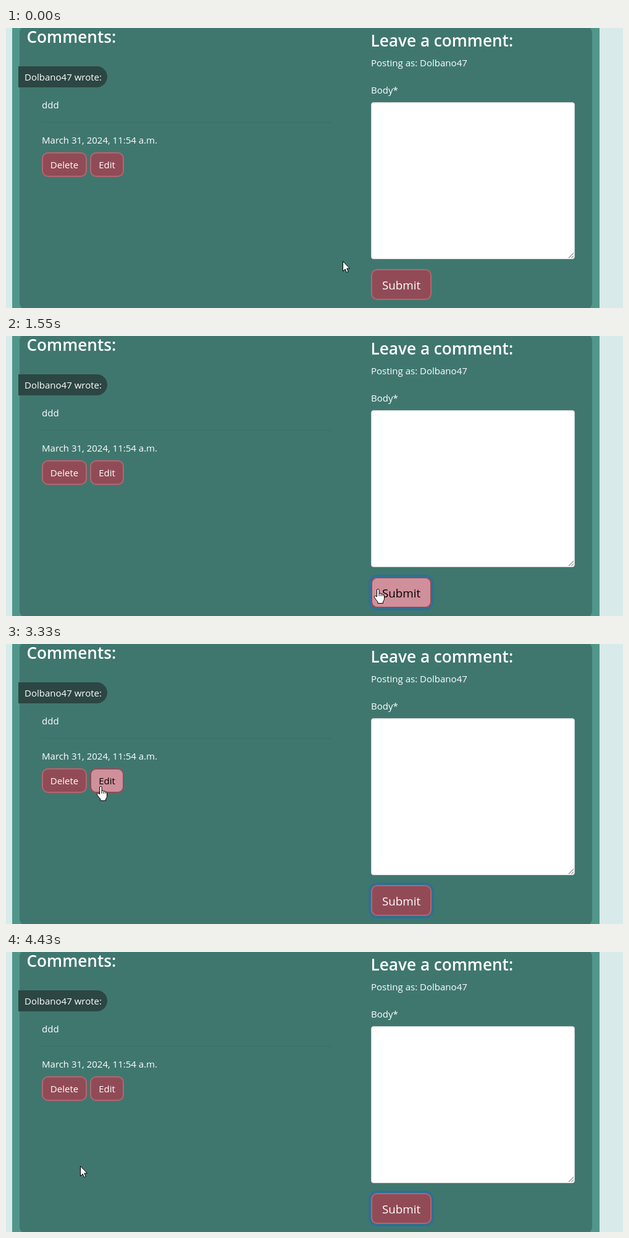
An HTML page that plays this animation: 999 px wide and 453 px high, repeating every 4.69 s.

```html
<!DOCTYPE html>
<html lang="en">
<head>
<meta charset="utf-8">
<title>Comments</title>
<style>
  html, body { margin: 0; width: 100%; height: 100%; overflow: hidden; background: #d8eae9; }
  svg { display: block; width: 999px; height: 453px; }
  text { font: 450 15px "Open Sans", "Noto Sans", sans-serif; fill: #fff; }
  .title { font-size: 26.2px; font-weight: 600; }
  .large { font-size: 18.75px; }
  .button rect { stroke-width: 2; fill: #914b56; stroke: #b5656f; }
  .button .hover rect { fill: #cf909b; stroke: #914b56; }
  .button .hover text { fill: #000; }
  #cursor path { fill: #fff; stroke: #000; stroke-linejoin: round; }
</style>
</head>
<body>
<svg viewBox="0 0 999 453">
  <rect x="10" width="951" height="453" fill="#50968b"/>
  <rect x="22" y="-5" width="927" height="462" rx="13" fill="#3f776f"/>

  <text class="title" x="33.5" y="24">Comments:</text>
  <path d="M20 62H147a17 17 0 0 1 0 34H20Z" fill="#2c4643"/>
  <text x="30" y="85">Dolbano47 wrote:</text>
  <text x="58" y="130">ddd</text>
  <path d="M58 152.5H527" stroke="#3a6d66"/>
  <text x="58" y="187">March 31, 2024, 11:54 a.m.</text>

  <text class="title" x="590.5" y="30">Leave a comment:</text>
  <text x="591" y="62">Posting as: Dolbano47</text>
  <text x="591" y="106">Body*</text>
  <rect x="591.5" y="120.5" width="329" height="253" rx="3.5" fill="#fff" stroke="#ced4da"/>
  <path d="M911 372l8-8M915.5 372l3.5-3.5" stroke="#555" fill="none"/>

  <rect id="ring" x="587" y="386" width="106" height="58" rx="14" fill="#2f7091"/>
  <g id="buttons"></g>
  <g id="cursor">
    <path id="arrow" d="M.5 .5V16.5L4.2 13 6.6 18.5 9.2 17.4 6.8 12H11.5Z"/>
    <g id="hand">
      <path d="M-2.5 13V2Q-2.5 .5-.7 .5T1.1 2V7.5Q3.3 6.3 4.3 8.3 6.3 7.3 7.2 9.3 9.4 8.8 9.5 11V16Q9.5 18.5 7.5 21V23.5H-1V21Q-4 18-6.6 13.8C-7.5 11.5-5 10.5-2.5 13Z"/>
      <path d="M1.1 7.5V12M4.2 8.5V12M7.1 9.5V12"/>
    </g>
  </g>
</svg>
<script>
const LOOP = 4690, TICK = 68.7, FADE = 150, CLICK = 1340;
const $ = id => document.getElementById(id);

const clamp = p => Math.min(1, Math.max(0, p));
const easeIn = p => p * p;
const easeOut = p => 1 - (1 - p) ** 2;
const smooth = p => p * p * (3 - 2 * p);

// Pointer stops, joined by curves that bend towards a control point.
const home = { x: 545, y: 377 };
const submit = { x: 603, y: 409 };
const middle = { x: 430, y: 339 };
const edit = { x: 154, y: 230 };
const remove = { x: 91, y: 217 };
const rest = { x: 120, y: 346 };

const legs = [
  { start: 190, end: 600, from: home, bend: { x: 570, y: 407 }, to: submit, ease: easeIn },
  { start: 1490, end: 1830, from: submit, bend: { x: 545, y: 372 }, to: middle, ease: easeIn },
  { start: 1830, end: 2380, from: middle, bend: { x: 310, y: 320 }, to: edit, ease: easeOut },
  { start: 3330, end: 3600, from: edit, bend: { x: 122, y: 223 }, to: remove, ease: smooth },
  { start: 4010, end: 4420, from: remove, bend: { x: 3, y: 250 }, to: rest, ease: smooth }
];

// The screen refreshes in bursts, at a fixed tick from each start.
const bursts = [0, 190, 1350, 3330, 4010];

const buttons = [
  { label: "Delete", x: 58, y: 201, w: 73, h: 40, on: 3440, off: 4060 },
  { label: "Edit", x: 136, y: 201, w: 55, h: 40, on: 2300, off: 3410 },
  { label: "Submit", x: 591, y: 390, w: 98, h: 50, on: 588, off: 1600, large: true }
];

function add(parent, tag, attrs) {
  const el = document.createElementNS("http://www.w3.org/2000/svg", tag);
  for (const key in attrs) el.setAttribute(key, attrs[key]);
  return parent.appendChild(el);
}

function addFace(parent, b, name) {
  const g = add(parent, "g", { class: name });
  add(g, "rect", { x: b.x + 1, y: b.y + 1, width: b.w - 2, height: b.h - 2, rx: 9 });
  const text = add(g, "text", {
    x: b.x + b.w / 2, y: b.y + b.h / 2 + (b.large ? 8 : 6),
    "text-anchor": "middle", class: b.large ? "large" : ""
  });
  text.textContent = b.label;
  return g;
}

for (const b of buttons) {
  const g = add($("buttons"), "g", { class: "button" });
  addFace(g, b, "normal");
  b.hover = addFace(g, b, "hover");
}

const fade = (t, start) => smooth(clamp((t - start) / FADE));
const inside = (b, p) => p.x >= b.x && p.x <= b.x + b.w && p.y >= b.y && p.y <= b.y + b.h;

function refreshTime(t) {
  const start = bursts.filter(s => s <= t).pop();
  return start + Math.floor((t - start) / TICK) * TICK;
}

function pointerAt(t) {
  const leg = legs.filter(l => l.start <= t).pop() || legs[0];
  const p = leg.ease(clamp((t - leg.start) / (leg.end - leg.start))), q = 1 - p;
  const curve = k => Math.round(q * q * leg.from[k] + 2 * q * p * leg.bend[k] + p * p * leg.to[k]);
  return { x: curve("x"), y: curve("y") };
}

function draw(t) {
  const time = refreshTime(t);
  const point = pointerAt(time);
  for (const b of buttons) b.hover.style.opacity = fade(time, b.on) - fade(time, b.off);
  $("ring").style.opacity = fade(time, CLICK);
  const over = buttons.some(b => inside(b, point));
  $("hand").style.display = over ? "" : "none";
  $("arrow").style.display = over ? "none" : "";
  $("cursor").setAttribute("transform", `translate(${point.x} ${point.y})`);
}

const began = performance.now();
function tick() {
  draw((performance.now() - began) % LOOP);
  requestAnimationFrame(tick);
}
tick();
</script>
</body>
</html>
```
